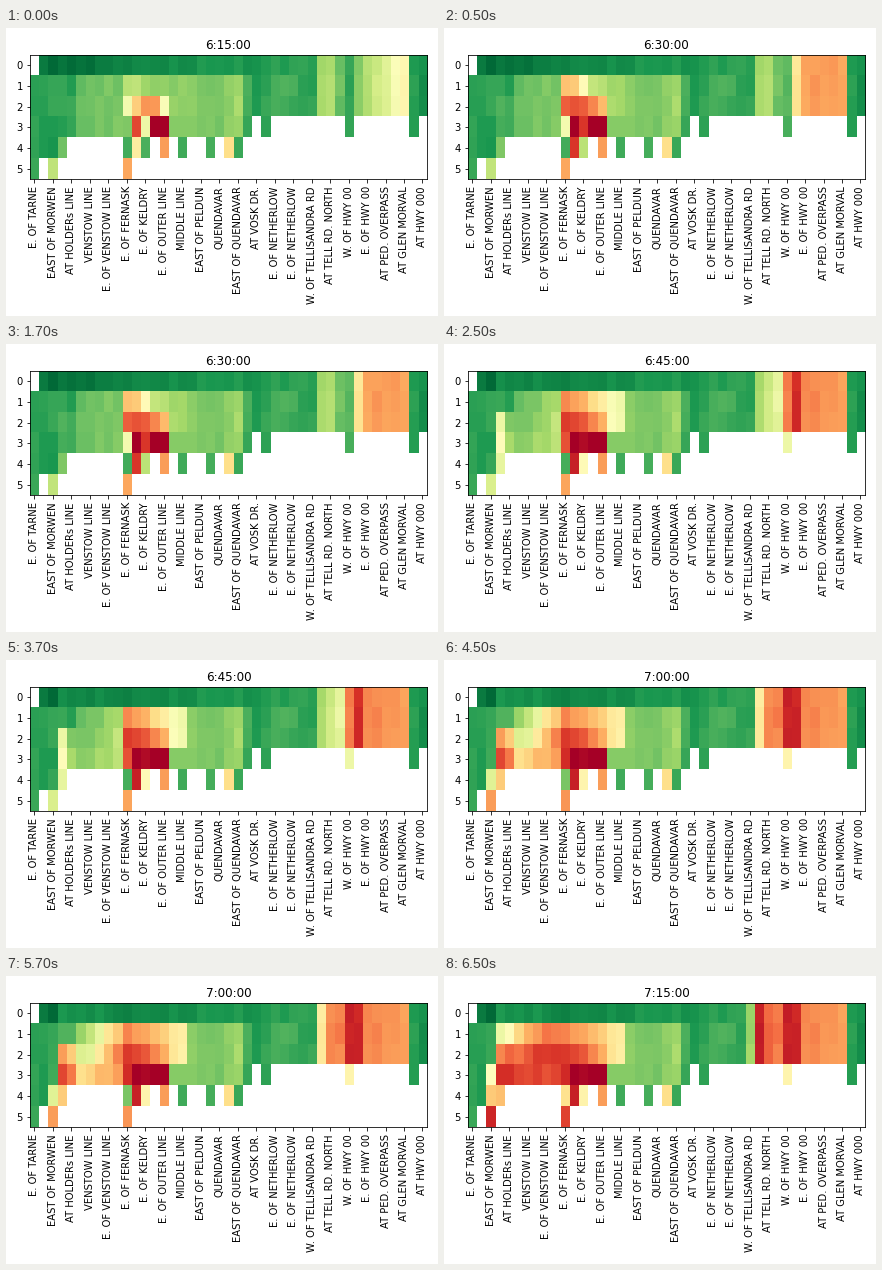
A matplotlib script that plays this animation: 432x288 px, repeating every 8 s.

```python
import matplotlib.pyplot as plt
import numpy as np
from matplotlib.animation import FuncAnimation

WIDTH, HEIGHT, DPI = 432, 288, 72
STEP_MS, STEPS = 500, 16
LANES, STATIONS = 6, 43
NEVER = 9

LABELS = [
    "E. OF TARNE", "EAST OF MORWEN", "AT HOLDERs LINE", "VENSTOW LINE",
    "E. OF VENSTOW LINE", "E. OF FERNASK", "E. OF KELDRY",
    "E. OF OUTER LINE", "MIDDLE LINE", "EAST OF PELDUN", "QUENDAVAR",
    "EAST OF QUENDAVAR", "AT VOSK DR.", "E. OF NETHERLOW",
    "E. OF NETHERLOW", "W. OF TELLISANDRA RD", "AT TELL RD. NORTH",
    "W. OF HWY 00", "E. OF HWY 00", "AT PED. OVERPASS", "AT GLEN MORVAL",
    "AT HWY 000",
]

# Stations that carry a sensor in each lane
SENSORS = [
    range(1, STATIONS), range(STATIONS), range(STATIONS),
    [*range(24), 25, 34, 41],
    [*range(4), 10, 11, 12, 14, 16, 19, 21, 22],
    [0, 2, 10],
]

# Free-flow speed, as {station: speed} key points
EAST_FREE = {30: 88, 31: 70, 32: 67, 33: 79, 34: 87, 35: 75, 40: 75, 41: 88,
             42: 92}
MAIN_FREE = {0: 88, 4: 87, 5: 79, 9: 77, 16: 73, 20: 77, 22: 70, 23: 85,
             24: 90, 26: 82, **EAST_FREE}
FREE = [
    {1: 96, 3: 99, 7: 97, 8: 94, 16: 91, 22: 88, 23: 93, 26: 87, **EAST_FREE},
    MAIN_FREE, MAIN_FREE, MAIN_FREE,
    {0: 85, 2: 92, 3: 78, 16: 87, 22: 84},
    {0: 86, 2: 64, 10: 28},
]

# Step at which the queue reaches a station; both jams grow westwards
EAST_ONSET = {17: NEVER, 29: NEVER, 30: 4, 31: 3.1, 32: 2.5, 33: 2.1,
              34: 1.65, 35: 1, 36: 0.4, 40: -0.1, 41: NEVER}
ONSET = [
    {2: NEVER, 3: 1.7, 8: 1.7, 9: NEVER, **EAST_ONSET},
    {2: NEVER, 3: 4, 6: 3.4, 9: 2.6, 10: 0.5, 11: 0.4, 13: 1.4, 16: 1.8,
     **EAST_ONSET},
    {2: NEVER, 3: 2, 5: 3.3, 6: 3.3, 9: 2.5, 10: 0.2, 13: -1, 14: 0, 15: 1.7,
     16: 1.7, **EAST_ONSET},
    {1: NEVER, 2: 4, 3: 2, 5: 2.9, 9: 2.6, 10: 1.2, 11: -0.5, 12: 0.3, 13: -2,
     14: -3, 15: NEVER, **EAST_ONSET},
    {1: NEVER, 2: 2.9, 3: 2, 10: 3.7, 11: 0, 12: 1, 14: -3, 16: NEVER,
     19: NEVER, 21: -3, 22: NEVER},
    {0: NEVER, 2: 2.8, 10: 3.7},
]

# Speed inside the queue
EAST_FLOOR = {30: 55, 31: 5, 32: 18, 33: 22, 34: 7, 35: 7, 36: 24, 40: 28}
FLOOR = [
    {8: 91, **EAST_FLOOR},
    {3: 25, 9: 20, 12: 30, 16: 44, **EAST_FLOOR},
    {3: 25, 6: 8, 9: 10, 12: 15, 14: 32, 15: 43, **EAST_FLOOR},
    {3: 8, 9: 14, 11: 0, 14: 0, 34: 47},
    {2: 35, 10: 20, 11: 8, 12: 45, 14: 28, 21: 41},
    {0: 5},
]


def profiles(lanes):
    """Join each lane's key points into one row of station values."""
    stations = np.arange(STATIONS)
    return np.array([np.interp(stations, list(points), list(points.values()))
                     for points in lanes])


free, onset, floor = map(profiles, (FREE, ONSET, FLOOR))
ripple = np.random.default_rng(4).uniform(-2, 2, free.shape)
steepness = np.where(np.arange(STATIONS) < 17, 2.8, 4)
missing = np.ones((LANES, STATIONS), bool)
for lane, stations in enumerate(SENSORS):
    missing[lane, list(stations)] = False


def speeds(time):
    """Every station slides from free flow to queue speed at its onset."""
    flowing = 1 / (1 + np.exp(steepness * (time - onset)))
    return np.ma.array(floor + (free - floor) * flowing + ripple, mask=missing)


plt.rcParams["font.family"] = "DejaVu Sans"
fig = plt.figure(figsize=(WIDTH / DPI, HEIGHT / DPI), dpi=DPI)
left, right, top, bottom = 23.8, 421.1, 27, 151.2
ax = fig.add_axes([left / WIDTH, 1 - bottom / HEIGHT,
                   (right - left) / WIDTH, (bottom - top) / HEIGHT])
image = ax.imshow(speeds(0), cmap="RdYlGn", vmin=0, vmax=100, aspect="auto",
                  interpolation="nearest")
ax.set_xticks(range(0, STATIONS, 2), LABELS, rotation=90, fontsize=10)
ax.set_yticks(range(LANES))
ax.tick_params(labelsize=10)
title = ax.set_title("", fontsize=12)


def update(step):
    # The first quarter hour is on show for a single step, the others for four
    quarter = (step + 3) // 4
    hours, minutes = divmod(6 * 60 + 15 * (quarter + 1), 60)
    image.set_data(speeds(quarter))
    title.set_text(f"{hours}:{minutes:02d}:00")
    return image, title


animation = FuncAnimation(fig, update, frames=STEPS, interval=STEP_MS,
                          repeat=True, repeat_delay=0)
plt.show()
```
